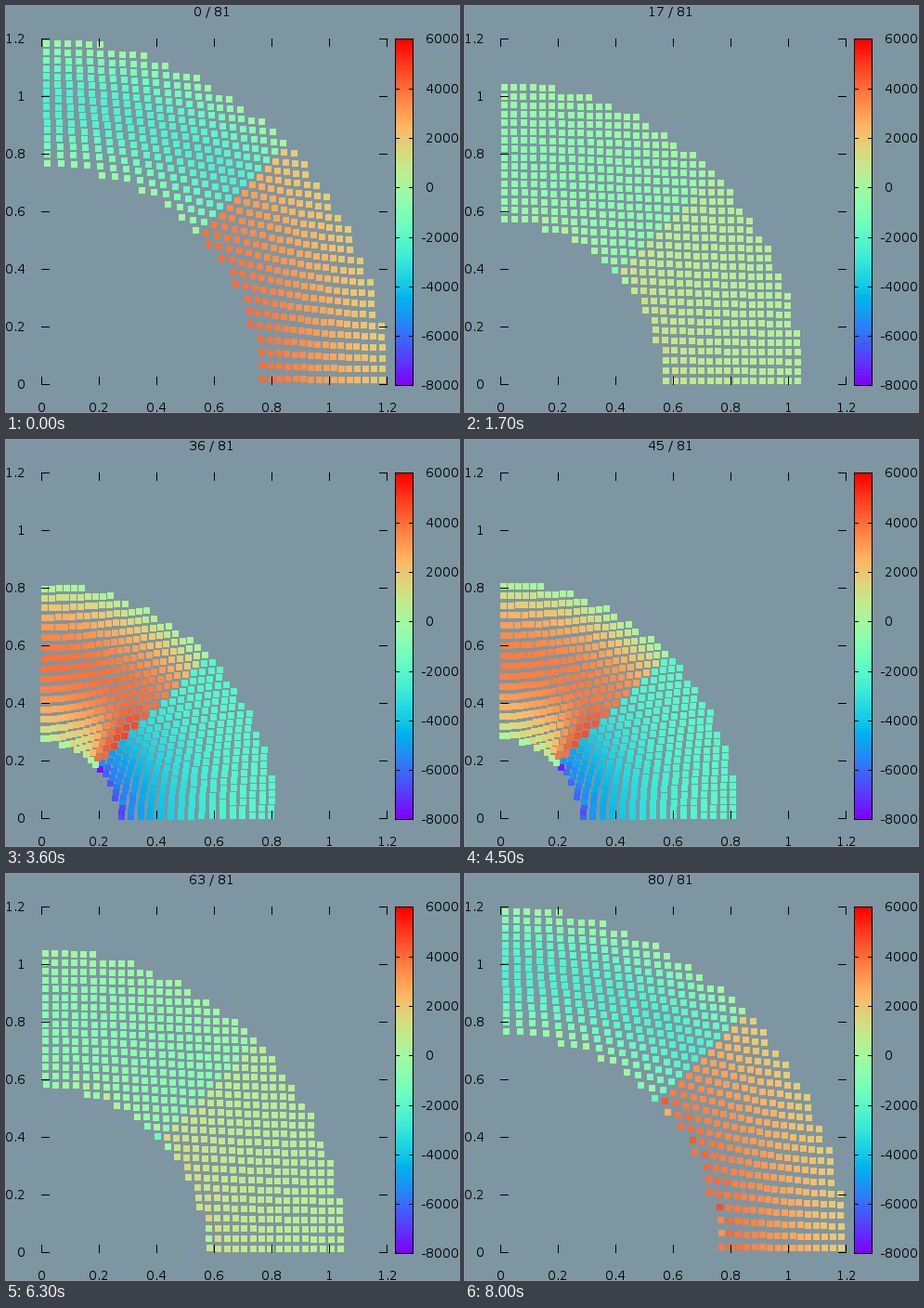
A matplotlib script for the animation above (8.1 s loop, 488x437 px).

```python
import numpy as np
import matplotlib.pyplot as plt
from matplotlib.animation import FuncAnimation
from matplotlib.collections import PolyCollection

WIDTH, HEIGHT, DPI = 488, 437, 100
FRAMES, INTERVAL = 81, 100
PERIOD = 79.6                         # frames per oscillation of the ring
LEFT, BASE, SCALE = 38, 407, 310      # plot origin and pixels per unit
LOW, HIGH = -8000, 6000
BAR_LEFT, BAR_RIGHT, BAR_TOP, BAR_BOTTOM = 419, 439, 35, 408
PIXEL = 72 / DPI

plt.rcParams["font.family"] = "DejaVu Sans"
plt.rcParams["font.size"] = 14 * PIXEL
plt.rcParams["text.hinting"] = "native"
plt.rcParams["text.hinting_factor"] = 1


def rainbow(value):
    t = np.clip((np.asarray(value, float) - LOW) / (HIGH - LOW), 0, 1)
    rgb = [np.abs(2 * t - 0.5), np.sin(np.pi * t), np.cos(np.pi * t / 2)]
    return np.clip(np.stack(rgb, axis=-1), 0, 1)


# Quarter ring of material points on a regular grid at rest.
cells = (np.arange(32) + 0.5) / 32
grid_x, grid_y = (g.ravel() for g in np.meshgrid(cells, cells))
inside = np.abs(np.hypot(grid_x, grid_y) - 0.75) < 0.25
rest_x, rest_y = grid_x[inside], grid_y[inside]
radius = np.hypot(rest_x, rest_y)
angle = np.arctan2(rest_y, rest_x)

# Radial displacement / radius, with a slight bulge towards both axes.
mode = 0.2 * (4 * radius**2 - 9 * radius + 6) * (1.03 - 0.045 * radius)
bulge = 1.7 / SCALE * np.cos(2 * angle) ** 2 / radius

arch = 16 * (radius - 0.5) * (1 - radius)         # zero on both free edges
ridge = (np.exp(-((np.degrees(angle) - 45) / 8) ** 2)
         * np.clip((radius - 0.5) / 0.03, 0, 1)
         * np.clip((0.75 - radius) / 0.2, 0, 1))
jitter = (np.random.default_rng(4).normal(0, 600, radius.size)
          * np.exp(-(radius - 0.5) / 0.04))
SQUARE = np.array([[-3, -3], [4, -3], [4, 4], [-3, 4]])


def ring_state(n):
    phase = np.cos(2 * np.pi * n / PERIOD)
    stretch = 1 + phase * mode
    scale = SCALE * (stretch + bulge)
    px = LEFT + np.floor(scale * rest_x - 0.5)
    py = BASE - np.floor(scale * rest_y - 0.5)
    hoop = 10000 * np.log(stretch) + 450 * phase**2 * arch
    radial = (890 * phase**2 - 3290 * phase) * arch
    radial += 3200 * max(0, -phase) * ridge
    stress = np.where(rest_y >= rest_x, radial, hoop)
    stress += jitter * min(1, n / 25)
    return np.stack([px, py], axis=-1)[:, None] + SQUARE, rainbow(stress)


fig = plt.figure(figsize=(WIDTH / DPI, HEIGHT / DPI), dpi=DPI,
                 facecolor="#7e96a2")
ax = fig.add_axes([0, 0, 1, 1])
ax.axis("off")


def box(x0, y0, x1, y1):
    """Corners of a block covering pixels x0..x1 and y0..y1."""
    return [(x0, y0), (x1 + 1, y0), (x1 + 1, y1 + 1), (x0, y1 + 1)]


def label(x, y, text, align):
    return ax.text(x, y, text, ha=align, va="baseline", color="black")


points = PolyCollection([], linewidths=0, antialiaseds=False, zorder=2)
ax.add_collection(points, autolim=False)

bar = rainbow(np.linspace(HIGH, LOW, 128))[:, None]
ax.imshow(bar, extent=(BAR_LEFT, BAR_RIGHT, BAR_BOTTOM + 1, BAR_TOP),
          aspect="auto", interpolation="nearest", zorder=1)
ax.set_xlim(0, WIDTH)
ax.set_ylim(HEIGHT, 0)

marks = [box(BAR_LEFT, BAR_TOP, BAR_RIGHT - 1, BAR_TOP),
         box(BAR_LEFT, BAR_BOTTOM, BAR_RIGHT - 1, BAR_BOTTOM),
         box(BAR_LEFT, BAR_TOP, BAR_LEFT, BAR_BOTTOM),
         box(BAR_RIGHT - 1, BAR_TOP, BAR_RIGHT - 1, BAR_BOTTOM)]

far_x, far_y = LEFT + 372, BASE - 372
for k in range(7):
    x, y = LEFT + 62 * k, BASE - 62 * k
    marks += [box(x, BASE - 8, x, BASE), box(x, far_y, x, far_y + 8),
              box(LEFT, y, LEFT + 8, y), box(far_x - 8, y, far_x, y)]
    text = f"{0.2 * k:g}"
    label(x + 0.5, 437, text, "center")
    label(21, y + 5, text, "right")

for value in range(LOW, HIGH + 1, 2000):
    y = int(np.ceil(BAR_BOTTOM - (value - LOW) / (HIGH - LOW) * 373))
    marks += [box(BAR_LEFT, y, BAR_LEFT + 4, y),
              box(BAR_RIGHT - 5, y, BAR_RIGHT - 1, y)]
    label(452 if value >= 0 else 447, y + 5, str(value), "left")

ax.add_collection(PolyCollection(marks, facecolors="black", linewidths=0,
                                 antialiaseds=False, zorder=3), autolim=False)
title = label(221.5, 11, "", "center")


def draw(n):
    verts, colors = ring_state(n)
    points.set_verts(verts)
    points.set_facecolor(colors)
    title.set_text(f"{n} / {FRAMES}")
    return points, title


animation = FuncAnimation(fig, draw, frames=FRAMES, interval=INTERVAL,
                          repeat=True, repeat_delay=0)
plt.show()
```
